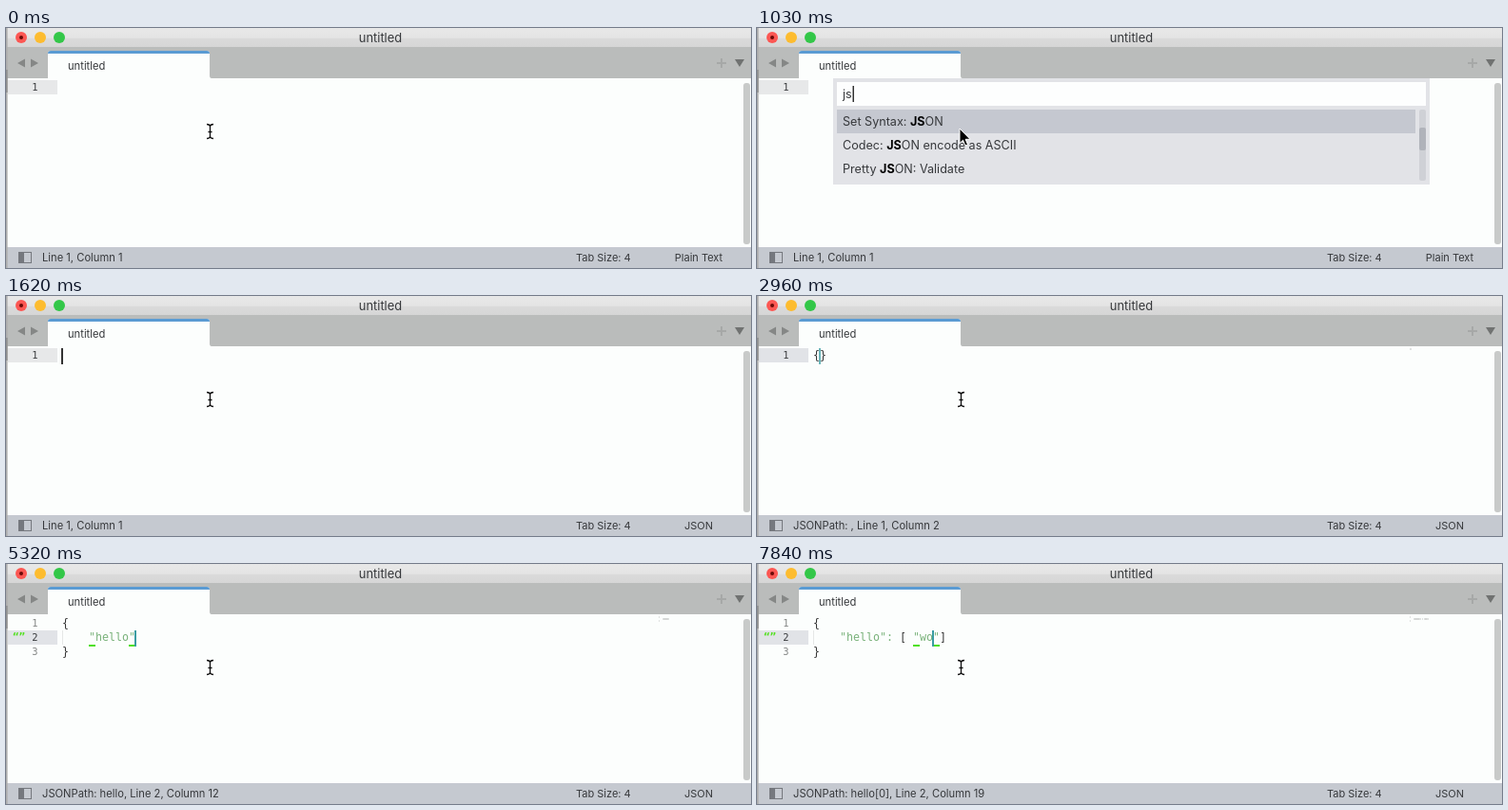
Recreate the animation shown at these times as an HTML page. Size 783 px wide and 253 px high, loop 7990 ms.

```html
<!DOCTYPE html>
<html lang="en">
<head>
<meta charset="utf-8">
<title>Editor</title>
<style>
  html, body { margin: 0; width: 100%; height: 100%; overflow: hidden; background: #fcfefd; }
  svg { display: block; width: 783px; height: 253px; }
  text { white-space: pre; font-family: Inter, "Open Sans", sans-serif; fill: #36383b; }
  .small { font-size: 11px; }
  .path { font-size: 11.2px; }
  .menu { font-size: 12.6px; }
  .menu tspan { font-weight: 700; fill: #000; }
  .code { font-family: "DejaVu Sans Mono", monospace; font-size: 11.63px; fill: #333; }
  .code tspan { fill: #79b27a; }
  .num { font-family: "DejaVu Sans Mono", monospace; font-size: 10.4px; fill: #858786; }
  .now { fill: #3b3d3f; }
  .icon { font-family: "DejaVu Sans Mono", monospace; font-size: 11px; font-weight: 700; }
</style>
</head>
<body>
<svg viewBox="0 0 783 253">
  <defs>
    <linearGradient id="bar" x2="0" y2="1">
      <stop offset="0" stop-color="#e8e8e8"/>
      <stop offset=".5" stop-color="#e4e4e4"/>
      <stop offset=".56" stop-color="#dadada"/>
      <stop offset="1" stop-color="#d6d6d6"/>
    </linearGradient>
  </defs>
  <rect width="783" height="253" fill="#fcfefd"/>
  <rect width="783" height="20.5" fill="url(#bar)"/>
  <rect y="20" width="783" height="33" fill="#babcbb"/>
  <path d="M44 53V27q0-3 3-3H211q3 0 3 3V50q0 3 2 3Z" fill="#fcfefd"/>
  <path d="M44 27q0-3 3-3H211q3 0 3 3Z" fill="#5a9bd3"/>
  <rect y="231" width="783" height="22" fill="#c5c9d0"/>
  <rect width="1.6" height="253" fill="#adadad"/>
  <rect y="44" width="1.6" height="24" fill="#8f8f8f"/>
  <circle cx="16" cy="10" r="6" fill="#fc5753"/>
  <circle cx="16" cy="10" r="2" fill="#6b0a08"/>
  <circle cx="36" cy="10" r="6" fill="#fdbc2f"/>
  <circle cx="56" cy="10" r="6" fill="#33c748"/>
  <text x="393.5" y="15" font-size="12.9" text-anchor="middle">untitled</text>
  <text x="65" y="44" font-size="11.2">untitled</text>
  <path d="M20 32.500V41.500L12 37ZM26 32.500V41.500L34 37Z" fill="#858786"/>
  <path d="M747 37H757M752 32V42" stroke="#a6a8a7" stroke-width="2"/>
  <path d="M766 33H776L771 41Z" fill="#707271"/>
  <rect x="775" y="58" width="7" height="170" rx="3" fill="#c8cac9"/>
  <rect x="13.500" y="236.500" width="13" height="11" fill="none" stroke="#75787e"/>
  <rect x="14" y="237" width="5" height="10" fill="#75787e"/>
  <text x="599" y="246" class="small">Tab Size: 4</text>
  <g id="view"></g>
</svg>
<script>
(() => {
const LOOP = 7990, X0 = 59, CW = 7, LH = 15;
const view = document.getElementById('view');

// Each entry changes only the listed fields of the state before it.
const steps = [
  [0, { mid: null, base: '', line: 1, col: 1, caret: 0, path: null, syntax: 'Plain Text', hl: '', query: null }],
  [150, { caret: 1 }],
  [590, { query: '', caret: 0 }],
  [1030, { query: 'js' }],
  [1180, { query: 'jso' }],
  [1620, { query: null, syntax: 'JSON', caret: 1 }],
  [1920, { caret: .65 }],
  [2070, { caret: .25 }],
  [2210, { caret: 0 }],
  [2510, { base: '{}', col: 2, path: '', caret: 1 }],
  [2960, { caret: .75 }],
  [3110, { mid: '', line: 2, col: 5, caret: 1 }],
  [3400, { hl: 'curly' }],
  [3550, { mid: '""', col: 6 }],
  [3690, { hl: 'quote' }],
  ...[3840, 3990, 4140, 4280, 4430].map((t, i) => {
    const word = 'hello'.slice(0, i + 1);
    return [t, { mid: `"${word}"`, col: 7 + i, path: word }];
  }),
  [4880, { caret: 0 }],
  [5320, { col: 12, caret: 1 }],
  [5620, { mid: '"hello":', col: 13 }],
  [5910, { mid: '"hello": ', col: 14 }],
  [6060, { caret: .8 }],
  [6500, { hl: 'curly', caret: .15 }],
  [6650, { mid: '"hello": []', col: 15, caret: 1 }],
  [6790, { hl: 'square' }],
  [6940, { mid: '"hello": [ ]', col: 16 }],
  [7240, { mid: '"hello": [ ""]', col: 17, path: 'hello[0]' }],
  [7540, { hl: 'quote' }],
  [7690, { mid: '"hello": [ "w"]', col: 18 }],
  [7840, { mid: '"hello": [ "wo"]', col: 19 }]
];
let last = {};
const states = steps.map(([t, patch]) => (last = { ...last, ...patch, t }));

const marks = { curly: '#6a1fe0', quote: '#4fe01a', square: '#2f7fe0' };

const rect = (x, y, w, h, fill, more = '') =>
  `<rect x="${x}" y="${y}" width="${w}" height="${h}" fill="${fill}" ${more}/>`;
const text = (x, y, cls, body, more = '') =>
  `<text x="${x}" y="${y}" class="${cls}" ${more}>${body}</text>`;
const colX = c => X0 + CW * (c - 1);
const rowY = n => 55 + LH * (n - 1);

function highlight(s) {
  if (!s.hl) return '';
  const color = marks[s.hl];
  const under = (line, col) => rect(colX(col), rowY(line) + 15, CW, 2, color);
  const icon = (x, line, body) => text(x, rowY(line) + 10, 'icon', body, `style="fill:${color}"`);
  if (s.hl === 'curly')
    return under(1, 1) + under(3, 1) + icon(9, 1, '{') + icon(9, 3, '}');
  const quote = s.hl === 'quote';
  const b = s.mid.lastIndexOf(quote ? '"' : ']');
  const a = s.mid.lastIndexOf(quote ? '"' : '[', b - 1);
  return under(2, a + 5) + under(2, b + 5) + icon(7, 2, quote ? '“”' : '[]');
}

function minimap(lines) {
  return lines.map((l, n) => [...l].map((c, i) => c === ' ' ? '' :
    rect(686 + i, 55.5 + 2 * n, 1, 1, '#333', `opacity="${/\w/.test(c) ? .38 : .28}"`)
  ).join('')).join('');
}

function editor(s) {
  const lines = s.mid === null ? [s.base] : ['{', '    ' + s.mid, '}'];
  let out = rect(2, rowY(s.line), 52, LH, s.path === null ? '#e7e8e9' : '#e1e3e7');
  lines.forEach((l, i) => {
    const n = i + 1, y = rowY(n) + 11;
    out += text(33.5, y, n === s.line ? 'num now' : 'num', n, 'text-anchor="end"');
    out += text(X0, y, 'code', l.replace(/"[^"]*":?/g, '<tspan>$&</tspan>'));
  });
  if (lines.length > 1) out += rect(X0, rowY(2), 1, LH, '#e6e8e7');
  out += highlight(s) + minimap(lines);
  if (s.caret) {
    const color = s.path === null ? '#333' : s.caret < .2 ? '#555' : '#3a9ca3';
    out += rect(colX(s.col) - 1, rowY(s.line), 2, 17, color, `opacity="${s.caret}"`);
  }
  return out;
}

function palette(s) {
  const n = s.query.length;
  const hit = `<tspan>${'JSON'.slice(0, n)}</tspan>${'JSON'.slice(n)}`;
  const items = n
    ? ['Set Syntax: ' + hit, `Codec: ${hit} encode as ASCII`, `Pretty ${hit}: Validate`]
    : ['About', 'Arithmetic', 'Automatic Package Reloader'];
  return rect(80, 53, 627, 112, '#e2e3e7') +
    rect(84, 57, 619, 25, '#fdfefe') +
    rect(84, 86, 608, 25, '#c5c8d0') +
    rect(696, 86, 7, 75, '#cfd1d6', 'rx="2"') +
    rect(696, n ? 105 : 86, 7, 24, '#b0b3ba', 'rx="2"') +
    text(90, 74, 'menu', s.query) +
    rect([89, 0, 100.5, 107][n], 61, 1.5, 17, '#333') +
    items.map((b, i) => text(90, 103 + 25 * i, 'menu', b)).join('');
}

const beam = '<path d="M211 101.500Q214 101.500 214.500 103.500Q215 101.500 218 101.500' +
  'M214.500 103V115M211 116.500Q214 116.500 214.500 114.500Q215 116.500 218 116.500M212.500 109.500H216.500" ' +
  'fill="none" stroke="#111" stroke-width="1.3"/>';
const arrow = '<path d="M213 106V121.500L216.500 118.200L218.900 124L221.500 122.900L219.100 117.300H224Z" ' +
  'fill="#000" stroke="#fff" stroke-width="1" stroke-linejoin="round"/>';

function render(s) {
  const where = `Line ${s.line}, Column ${s.col}`;
  view.innerHTML = editor(s) + (s.query !== null ? palette(s) + arrow : beam) +
    text(38, 246, 'path', s.path === null ? where : `JSONPath: ${s.path}, ${where}`) +
    text(728, 246, 'small', s.syntax, 'text-anchor="middle"');
}

let shown = null;
function tick(now) {
  const t = now % LOOP;
  const s = states.filter(s => s.t <= t).pop() || states[0];
  if (s !== shown) render(shown = s);
  requestAnimationFrame(tick);
}
tick(performance.now());
})();
</script>
</body>
</html>
```
